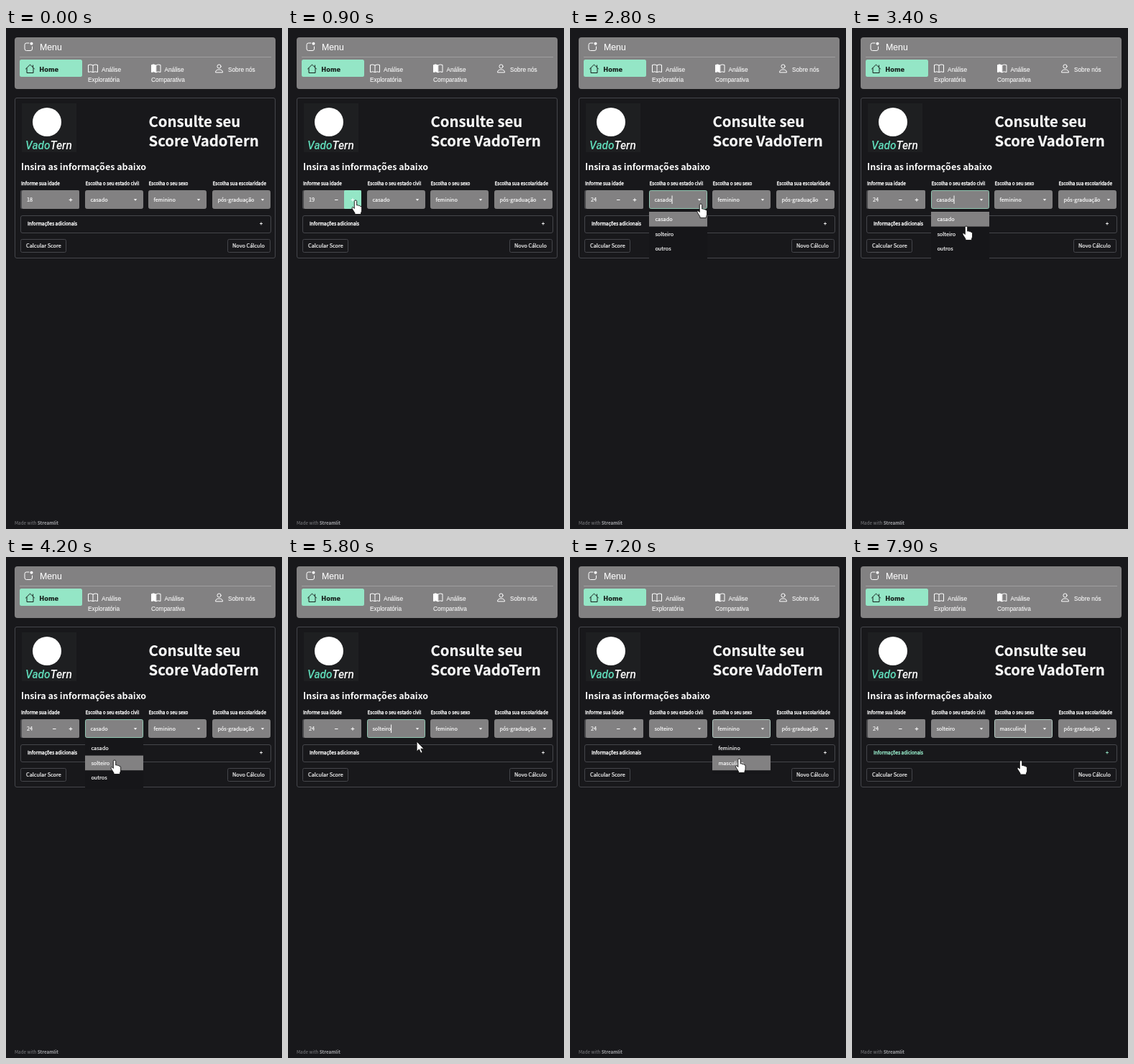
An HTML page that plays this animation: 384 by 698 pixels, repeating every 8000 ms.

```html
<!DOCTYPE html>
<html lang="pt">
<head>
<meta charset="utf-8">
<style>
  html, body { margin: 0; width: 100%; height: 100%; overflow: hidden; background: #18181b; }
  svg { display: block; width: 100%; height: 100%; }
  text { fill: #fafafa; stroke: #fafafa; stroke-width: .2; font: 500 7.3px "Noto Sans CJK JP", "Noto Sans CJK SC", "Open Sans", sans-serif; }
  .label { font-size: 6.4px; stroke-width: .35; }
  .h1 { font-size: 20.3px; font-weight: 700; }
  .h2 { font-size: 12.5px; font-weight: 600; stroke: none; }
  .nav text { font: 8.25px "Liberation Sans", sans-serif; stroke-width: .1; }
  .nav .title { font-size: 12.3px; }
  .nav .active { font: 700 8.3px "DejaVu Sans", sans-serif; fill: #16211d; stroke: #16211d; }
  .brand { font: italic 500 15.5px Roboto, sans-serif; stroke: none; }
  .icon { fill: none; stroke: #fff; stroke-width: 1; stroke-linejoin: round; stroke-linecap: round; }
  .outline { fill: none; stroke: #45464b; }
  .footer { font-size: 6.3px; font-weight: 400; fill: #808185; stroke: none; }
  .footer tspan { font-weight: 700; fill: #a3a4a8; }
  .cursor path { fill: #fff; stroke: #111; stroke-width: .9; stroke-linejoin: round; }
</style>
</head>
<body>
<svg viewBox="0 0 384 698" preserveAspectRatio="none">
  <g class="nav">
    <rect x="12" y="13" width="363" height="72" rx="4" fill="#828182"/>
    <path d="M19 40.500H369" stroke="#a09fa0"/>
    <rect x="19" y="44" width="87" height="24" rx="2.500" fill="#94e6c6"/>
    <path class="icon" d="M32 21H28.500Q26 21 26 23.500V29Q26 31.500 28.500 31.500H34Q36.500 31.500 36.500 29V26"/>
    <circle cx="35.500" cy="21.800" r="2" fill="#fff"/>
    <path class="icon" style="stroke:#16211d" d="M27.500 57L33.500 51L39.500 57M29 56V62.500H38V56M37.500 52V54.500"/>
    <path class="icon" d="M121 52Q118 50 114.500 51.500V61.500Q118 60 121 61.700Q124 60 127.500 61.500V51.500Q124 50 121 52V61.700"/>
    <path class="icon" d="M208.500 52Q211.500 50 215 51.500V61.500Q211.500 60 208.500 61.700"/>
    <path class="icon" style="fill:#fff" d="M208.500 52Q205.500 50 202.500 51.500V61.500Q205.500 60 208.500 61.700Z"/>
    <circle class="icon" cx="296.500" cy="53.500" r="2.600"/>
    <path class="icon" d="M291.500 61.500Q291.500 58 296.500 58Q301.500 58 301.500 61.500Z"/>
    <text class="title" x="47" y="30.500">Menu</text>
    <text class="active" x="46.300" y="61">Home</text>
    <text x="133" y="61">Análise</text><text x="114" y="75">Exploratória</text>
    <text x="220.500" y="61">Análise</text><text x="202" y="75">Comparativa</text>
    <text x="309" y="61">Sobre nós</text>
  </g>

  <rect class="outline" x="12.500" y="97.500" width="362" height="223" rx="2.500"/>
  <rect x="22" y="105" width="76" height="68" fill="#1e1f21"/>
  <circle cx="57" cy="131" r="20" fill="#fff"/>
  <text class="brand" x="27" y="169"><tspan fill="#5fd9b8">Vado</tspan>Tern</text>
  <text class="h1" x="198.500" y="138">Consulte seu</text>
  <text class="h1" x="198.500" y="165">Score VadoTern</text>
  <text class="h2" x="21" y="198.300">Insira as informações abaixo</text>

  <text class="label" x="21" y="219.300">Informe sua idade</text>
  <rect x="20" y="226" width="82" height="26" rx="2" fill="#4a4a4d"/>
  <rect x="22" y="226" width="80" height="26" rx="2" fill="#828182"/>
  <rect id="plusHover" x="78" y="226" width="24" height="26" rx="1.500" fill="#94e6c6"/>
  <text id="age" x="29" y="241.700"></text>
  <path id="minus" d="M65 239.500H69.500" stroke="#fff"/>
  <path d="M87.700 239.500H92.300M90 237.200V241.800" stroke="#fff"/>
  <g id="selects"></g>

  <rect class="outline" x="20.500" y="261.500" width="348" height="24" rx="2.500"/>
  <g id="expander">
    <text class="label" style="fill:inherit;stroke:inherit" x="30" y="275.300">Informações adicionais</text>
    <path d="M353 272.500H357M355 270.500V274.500" stroke-width=".9"/>
  </g>
  <rect class="outline" x="20.500" y="294.500" width="63" height="18" rx="2"/>
  <text x="28" y="305.700">Calcular Score</text>
  <rect class="outline" x="308.500" y="294.500" width="59" height="18" rx="2"/>
  <text x="315" y="305.700">Novo Cálculo</text>
  <text class="footer" x="12" y="691.500">Made with <tspan>Streamlit</tspan></text>

  <g id="menus"></g>
  <g class="cursor" id="cursor">
    <path id="arrow" d="M0 0V14L3.300 11L5.700 16.200L8 15.200L5.700 10.200H10Z"/>
    <path id="hand" d="M-1.700 1.500Q-1.700 0 0 0Q1.700 0 1.700 1.500V7Q3.500 6.300 4.400 7.600Q6 7 6.700 8.400Q8.600 8 8.600 10V14Q8.600 16 7.500 17.500V19.500H-1V17.800L-4.700 12Q-5.600 10 -4.200 9.600Q-3 9.600 -1.700 11.500Z"/>
  </g>
</svg>
<script>
const LOOP = 8000, MINT = '#94e6c6', GREY = '#828182', ROW = 20.6, MENU_TOP = 256;
const byId = id => document.getElementById(id);
const show = (el, on) => el.setAttribute('visibility', on ? 'visible' : 'hidden');

function add(parent, tag, attrs, text = '') {
  const el = document.createElementNS('http://www.w3.org/2000/svg', tag);
  for (const key in attrs) el.setAttribute(key, attrs[key]);
  el.textContent = text;
  return parent.appendChild(el);
}

// Pointer tip: [time, x, y]
const path = [
  [600, 103, 256], [900, 94, 240], [1100, 94, 240], [1600, 94, 238],
  [2300, 94, 238], [2600, 184, 245], [2800, 182, 245], [3400, 159, 276],
  [3600, 151, 286], [3700, 151.5, 291], [3900, 151.5, 291], [4200, 151, 283],
  [5300, 151, 283], [5800, 179, 257], [6100, 215, 243], [6600, 255, 240],
  [6900, 238, 265], [7100, 236, 278], [7300, 235, 284], [8000, 235, 283.5]
];
const ageClicks = [900, 1600, 1800, 2000, 2200, 2400];

const fields = [
  { x: 110, label: 'Escolha o seu estado civil', options: ['casado', 'solteiro', 'outros'],
    open: 2800, pick: 4400, blur: 6600, blink: 400, border: '#8fc5b0' },
  { x: 198, label: 'Escolha o seu sexo', options: ['feminino', 'masculino'],
    open: 6600, pick: 7800, blur: LOOP, blink: 600, border: '#b4cbc2' },
  { x: 287, label: 'Escolha sua escolaridade', options: ['pós-graduação'] }
];

for (const f of fields) {
  const base = byId('selects');
  add(base, 'text', { class: 'label', x: f.x + .4, y: 219.3 }, f.label);
  f.box = add(base, 'rect', { x: f.x + .5, y: 226.5, width: 80, height: 25, rx: 2, fill: GREY });
  f.value = add(base, 'text', { x: f.x + 7.4, y: 241.7 }, f.options[0]);
  add(base, 'path', { d: `M${f.x + 67.8} 238.300h4.400l-2.200 2.400z`, fill: '#fff' });
  f.caret = add(base, 'path', { stroke: '#fff' });
  f.menu = add(byId('menus'), 'g', {});
  const height = f.options.length * ROW + 8;
  add(f.menu, 'rect', { x: f.x, y: MENU_TOP - 3, width: 81, height, rx: 2, fill: '#161619' });
  f.highlight = add(f.menu, 'rect', { x: f.x, width: 81, height: ROW, fill: GREY });
  f.options.forEach((name, i) =>
    add(f.menu, 'text', { x: f.x + 8.4, y: MENU_TOP + 13 + i * ROW }, name));
}

function pointerAt(t) {
  const i = path.findIndex(p => p[0] > t);
  if (i < 1) return path[0].slice(1);
  const [a, b] = [path[i - 1], path[i]];
  const u = (t - a[0]) / (b[0] - a[0]);
  return [a[1] + (b[1] - a[1]) * u, a[2] + (b[2] - a[2]) * u];
}

function drawField(f, t, y) {
  const focused = t >= f.open && t < f.blur;
  const opened = t >= f.open && t < f.pick;
  f.value.textContent = f.options[t >= f.pick ? 1 : 0];
  f.box.setAttribute('stroke', focused ? f.border : GREY);
  show(f.caret, focused && (t - f.blink) % 1000 < 500);
  f.caret.setAttribute('d', `M${f.x + 7.8 + f.value.getComputedTextLength()} 233.500V245`);
  show(f.menu, opened);
  const row = Math.max(0, Math.min(f.options.length - 1, Math.floor((y - MENU_TOP - .6) / ROW)));
  f.highlight.setAttribute('y', MENU_TOP + row * ROW);
  return opened;
}

function draw(t) {
  const [x, y] = pointerAt(t), present = t >= 600;
  const opened = fields.map(f => drawField(f, t, y)).some(Boolean);
  const inRow = present && y >= 226 && y <= 252;
  const onPlus = inRow && x >= 78 && x <= 102;
  const onSelect = inRow && fields.some(f => x >= f.x && x <= f.x + 81);
  const onExpander = present && !opened && y >= 261 && y <= 286;

  const age = 18 + ageClicks.filter(c => t >= c).length;
  byId('age').textContent = age;
  show(byId('minus'), age > 18);
  show(byId('plusHover'), onPlus);
  for (const paint of ['fill', 'stroke'])
    byId('expander').setAttribute(paint, onExpander ? MINT : '#fafafa');

  const pointing = opened || onPlus || onSelect || onExpander;
  byId('cursor').setAttribute('transform', `translate(${x} ${y})`);
  show(byId('hand'), present && pointing);
  show(byId('arrow'), present && !pointing);
}

const start = performance.now();
function tick() {
  draw((performance.now() - start) % LOOP);
  requestAnimationFrame(tick);
}
tick();
</script>
</body>
</html>
```
